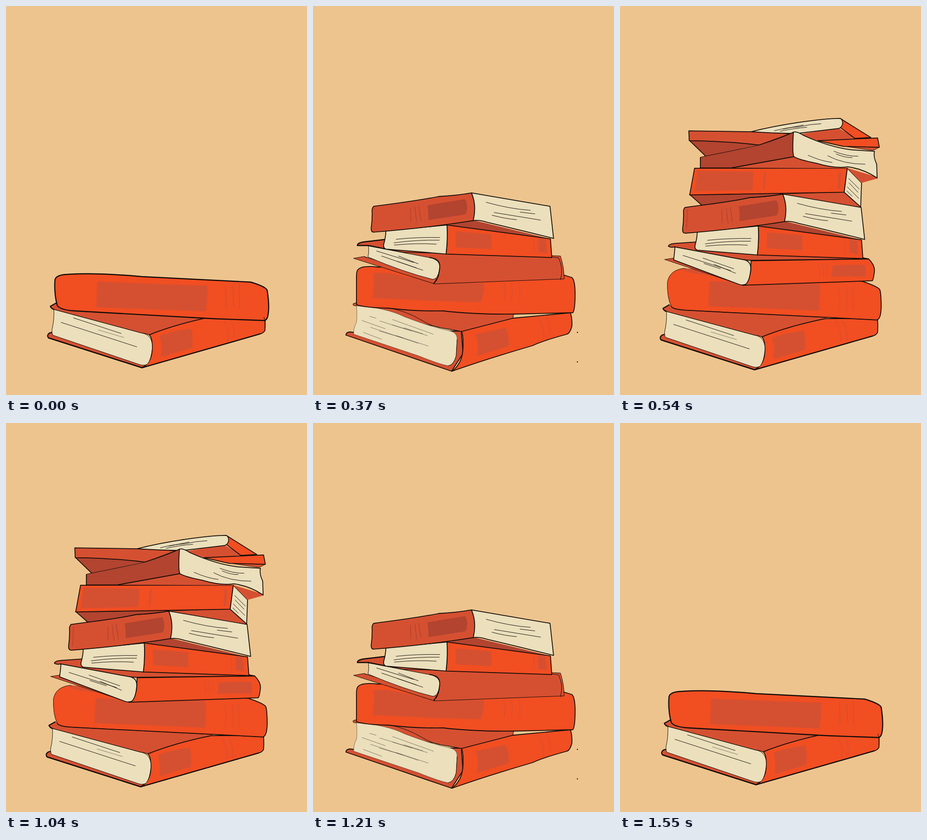
Recreate the animation shown at these times as an HTML page. Size 658 by 851 pixels, loop 1.75 s.

```html
<!DOCTYPE html>
<html lang="en">
<head>
<meta charset="utf-8">
<title>Book stack</title>
<style>
  html, body { margin: 0; width: 100%; height: 100%; overflow: hidden; background: #edc48e; }
  svg { display: block; width: 658px; height: 851px; }
  path { stroke: #0f0b08; stroke-width: 1.8; stroke-linejoin: round; stroke-linecap: round; fill: none; }
  .o { fill: #f14e22; }
  .r { fill: #d55031; }
  .d { fill: #b24430; }
  .c { fill: #ebdfbc; }
  .n { stroke: none; }
  .t { stroke-width: 1; }
  .h { stroke-width: .5; }
  .b { stroke-width: 2.4; }
  .mr { stroke: #d55031; stroke-width: 1.4; }
  .md { stroke: #b24430; stroke-width: 1.6; }
  .mb { stroke: #b35a32; stroke-width: 1.2; }
  .pic { visibility: hidden; }
</style>
</head>
<body>
<svg viewBox="0 0 658 851">
<defs>
  <g id="base">
    <path class="r b" d="M103 716L93 719Q86 724 91 730L301 797L318 786Z"/>
    <path class="r n" d="M108 651L95 659L102 666L300 719L317 724Q380 698 460 682L480 670L300 650Z"/>
    <path class="o" d="M317 723Q380 698 460 682L577 682Q578 700 577 713Q574 719 566 721L301 797Q324 785 324 752Q324 728 317 723Z"/>
    <path class="c t" d="M103 666L300 719Q325 723 324 752Q322 778 313 789Q306 793 296 790L101 724Q98 720 99 710Q104 690 103 666Z"/>
    <path class="b" d="M109 651L95 659Q97 664 103 666M91 730L301 797L566 721"/>
    <path class="t" d="M103 666L300 719Q312 720 317 723M147 685L254 720M119 695L289 750"/>
    <path class="h" d="M203 712L260 729"/>
    <path class="r n" d="M340 725Q375 713 410 709Q416 715 414 752L343 773Q347 748 340 725Z"/>
    <path class="mr" d="M482 685Q496 705 494 735M496 683Q511 705 507 731"/>
  </g>

  <g id="thick">
    <path class="o t" d="M143 569Q110 572 105 600Q104 635 114 655Q118 661 145 663L300 671L575 685Q585 683 585 655Q585 625 582 617Q578 610 545 599L450 590L190 580Z"/>
    <path class="r n" d="M143 570Q165 566 215 586Q165 582 143 575Z"/>
    <path class="r n" d="M200 598Q197 630 198 654L445 664Q448 630 447 604L275 600Z"/>
    <path class="mr" d="M489 613Q495 635 490 662M506 612Q510 638 508 664M520 610Q524 636 521 662"/>
    <path d="M114 655Q118 661 145 663L300 671L575 685Q585 683 585 655Q585 625 582 617Q578 610 545 599"/>
  </g>

  <g id="flat">
    <path class="r t" d="M99 549L119 546L280 596L275 607Z"/>
    <path class="r" d="M120 521Q112 523 107 519Q109 514 122 513L167 510L330 502L557 548L293 551Q270 551 200 537Z"/>
    <path class="o" d="M293 552L557 548Q571 562 570 575Q568 594 565 597L275 607Q290 595 292 575Z"/>
    <path class="c" d="M122 521L272 549Q294 551 292 572Q290 595 282 604Q276 608 266 605L119 550Q121 535 122 521Z"/>
    <path class="t" d="M140 540L247 574M185 546L254 570M187 558L224 570M210 560L258 580"/>
    <path class="r n" d="M475 563Q510 560 549 561Q553 575 549 588Q510 586 473 588Q477 576 475 563Z"/>
    <path class="mr" d="M443 563Q449 575 447 586M453 561Q458 574 455 586M461 561Q466 574 463 584"/>
  </g>

  <g id="split">
    <path class="d n" d="M309 474L368 463L541 505Z"/>
    <path class="o" d="M309 474L541 505L544 547L307 539Q311 505 309 474Z"/>
    <path class="c" d="M172 487L309 474Q311 505 307 539L172 528Q166 526 167 518Q172 500 172 487Z"/>
    <path class="t" d="M195 506Q240 501 293 502M190 514Q240 507 292 508M191 519Q240 514 285 517"/>
    <path class="r n" d="M329 488L408 495V528L328 524Z"/>
    <path class="r n" d="M514 503L530 505L533 538L514 534Z"/>
    <path class="mr" d="M504 505L505 535"/>
  </g>

  <g id="corner">
    <path class="r" d="M145 432Q240 420 290 410Q330 408 364 402Q374 425 371 450L368 464Q270 480 145 490Q139 490 139 482Q142 460 141 440Q142 434 145 432Z"/>
    <path class="c" d="M364 402L540 432L548 504Q460 482 400 468Q380 462 368 464Q376 430 364 402Z"/>
    <path class="d n" d="M265 430Q330 419 350 416Q358 432 351 450Q300 458 267 463Q268 445 265 430Z"/>
    <path class="md" d="M227 436L228 466M237 434L241 468M246 432L251 465"/>
    <path class="t" d="M397 423Q450 438 496 441M473 445L506 449M415 446L519 463M410 452Q440 460 465 462"/>
  </g>
  <path id="bar" class="md" d="M150 438L148 480"/>

  <g id="box">
    <path class="d" d="M155 403L182 427Q260 417 290 410Q330 408 364 402L330 395Z"/>
    <path class="r t" d="M364 402L540 432L502 397Z"/>
    <path class="o" d="M166 344H509L502 398L155 404Z"/>
    <path class="c" d="M509 344L541 377L539 431L502 398Z"/>
    <path class="r n" d="M173 350L298 352L296 393L166 396Z"/>
    <path class="r n" d="M322 354h4l-3 37h-4zM489 354h6l-2 36h-6z"/>
    <path class="t" d="M512 367L536 391M513 377L533 398M509 386L535 412M508 395L520 407"/>
  </g>

  <g id="wave">
    <path class="r n" d="M480 335L576 364L577 367L541 377L509 344L250 343L389 316Z"/>
    <path class="d t" d="M180 319Q290 297 310 292Q360 276 388 263Q386 290 389 318L250 343H179Z"/>
    <path class="c" d="M388 263Q395 260 412 271Q470 297 520 303L570 306Q567 318 575 335L576 366Q545 345 510 341Q480 345 440 333Q400 325 389 318Q385 310 388 263Z"/>
    <path d="M179 343V320M250 343L389 318M310 292Q360 276 388 263"/>
    <path class="t" d="M479 306Q510 318 533 317M465 316Q500 335 549 335M421 315Q450 328 475 331M484 312Q505 321 520 320"/>
  </g>

  <g id="slim">
    <path class="d n" d="M155 281L191 318L312 291L388 263L260 265Z"/>
    <path class="r" d="M153 260L293 262Q340 262 380 267L312 292Q240 283 154 282Z"/>
    <path d="M155 282L191 317"/>
    <path class="r n" d="M488 253L530 277L445 283L400 268Z"/>
    <path class="o" d="M493 232L562 275L526 277L490 250Z"/>
    <path class="r t" d="M505 295L581 297L567 304Z"/>
    <path class="o" d="M443 282L577 276L581 297L500 295Z"/>
    <path class="c" d="M293 262Q340 250 400 241Q460 232 493 232Q500 236 498 246Q495 254 488 255L395 266Q340 265 293 262Z"/>
    <path class="t" d="M345 260Q375 252 400 251Q425 245 450 244M358 261Q390 254 418 252M365 256L410 247"/>
  </g>

  <g id="tilt">
    <path class="d t" d="M312 220L404 242Q350 250 293 262Q240 257 185 261Q250 245 312 220Z"/>
    <path class="o" d="M318 179Q330 177 370 192Q430 218 495 232Q450 236 404 242L312 220Q320 200 318 179Z"/>
    <path class="c t" d="M179 219Q260 200 318 179Q322 195 312 220Q270 238 220 255Q200 262 170 261Q170 248 180 236Q184 225 179 219Z"/>
    <path class="b" d="M235 204Q280 194 318 179Q330 177 370 192Q430 218 495 232"/>
    <path class="t" d="M206 227Q245 208 287 205M190 238Q225 232 245 219Q262 211 284 209M205 237Q235 228 252 219M240 220Q260 213 280 213"/>
  </g>

  <g id="top">
    <path class="r t" d="M223 181L240 203L300 184Z"/>
    <path class="r t" d="M360 187L430 181L452 220Q410 208 360 187Z"/>
    <path class="o" d="M437 145L481 229L451 219L430 181Z"/>
    <path class="c" d="M231 142Q290 135 350 137Q375 128 400 130Q425 133 437 145Q435 165 430 181Q395 183 365 187L318 179L295 184Q260 182 223 180Z"/>
    <path class="t" d="M277 155Q310 157 340 153Q370 152 389 155M264 162Q300 160 328 163M280 166Q310 163 330 166"/>
  </g>

  <g id="stack3">
    <use href="#base"/><use href="#thick"/><use href="#flat"/>
  </g>
  <g id="stack8">
    <use href="#stack3"/><use href="#split"/><use href="#corner"/><use href="#bar"/>
    <use href="#box"/><use href="#slim"/><use href="#wave"/>
  </g>
</defs>

<g class="pic" id="two">
  <use href="#base" transform="translate(4.4 15.5) scale(.9735)"/>
  <path class="o b" d="M107 600Q108 588 135 587Q200 583 297 592L535 604Q568 614 571 622Q577 660 572 680Q569 689 563 688L452 684L150 667Q118 665 112 655Q105 630 107 600Z"/>
  <path class="r n" d="M199 603L440 612Q441 640 436 668L197 659Q199 630 199 603Z"/>
  <path class="mb" d="M480 611L481 660M496 613L498 658M510 608L511 662"/>
  <path class="t" d="M564 681Q567 690 566 704"/>
</g>

<g class="pic" id="three">
  <use href="#stack3" transform="translate(-8.7 -2.4) scale(1.008)"/>
</g>

<g class="pic" id="five">
  <path class="r" d="M90 714L80 713Q72 714 72 720L303 799L328 760L324 711Z"/>
  <path class="r t" d="M98 648L88 651Q85 656 95 656L200 688L325 712L437 683L440 665L165 655Z"/>
  <path class="c h" d="M95 656Q160 660 200 680Q260 703 300 711Q316 715 315 730L313 765Q308 785 296 787Q280 785 230 765L89 718Q88 705 95 692Q97 675 95 656Z"/>
  <path class="r n" d="M165 660Q230 683 278 703L325 711L437 683L300 664Z"/>
  <path class="o" d="M325 712L437 683L563 671Q567 685 566 700Q562 716 555 718Q500 733 480 743Q380 772 304 799Q328 780 328 745Q329 725 325 712Z"/>
  <path class="t" d="M165 660Q205 668 235 686Q262 703 290 706L325 712M315 730L313 765Q308 785 296 787"/>
  <path class="h" d="M124 679L138 683M174 686L263 718M146 689L216 711M174 698L250 721M107 688L158 706M126 703L230 738M145 711L196 726M182 721L252 744M110 714L150 729M199 704L240 717"/>
  <path class="r n" d="M355 718L420 704Q429 715 428 744L358 766Q364 740 355 718Z"/>
  <path class="mr" d="M493 683Q506 705 504 730M510 680Q519 695 517 715"/>
  <path class="o" d="M141 571Q106 567 98 577Q95 580 95 592V653Q110 660 165 661Q220 668 285 667Q350 675 440 674L568 671Q573 665 573 630Q573 600 566 594L550 589L264 570Z"/>
  <path class="r n" d="M132 584H165L264 605L374 606Q374 635 366 648L260 645L130 639Q135 610 132 584Z"/>
  <path class="mr" d="M417 605Q422 625 417 646M433 604Q438 625 433 645M450 603Q454 625 452 648"/>
  <path class="r t" d="M89 552L111 548L270 597L264 607Z"/>
  <path class="r b" d="M155 511L112 516Q97 518 97 524L121 524L200 540L294 540L521 546L300 505Z"/>
  <path class="r t" d="M200 539L290 541L521 546L541 547Q549 572 549 597L264 608Q278 595 277 567Z"/>
  <path class="t" d="M523 549L537 551Q548 575 541 599M113 548L118 551"/>
  <path class="c t" d="M121 525L268 553Q279 557 277 575Q273 598 262 598Q200 583 120 549Q123 538 121 525Z"/>
  <path d="M255 550Q279 555 277 572Q274 600 264 606"/>
  <path class="t" d="M139 536L220 561M150 547L240 578M187 547L230 564M185 559L226 573"/>
  <g transform="translate(-8.4 17) scale(.975)">
    <use href="#split"/><use href="#corner"/>
  </g>
  <path class="b" d="M578 714h.1M578 778.500h.1"/>
</g>

<g class="pic" id="eight">
  <use href="#stack8" transform="translate(1.4 20) scale(.9735)"/>
</g>

<g class="pic" id="ten">
  <use href="#stack8"/><use href="#top"/><use href="#tilt"/>
</g>
</svg>
<script>
  const LOOP = 1750;
  const steps = [
    [0, 'two'], [200, 'three'], [370, 'five'], [540, 'eight'], [710, 'ten'],
    [1040, 'eight'], [1210, 'five'], [1380, 'three'], [1550, 'two']
  ];
  const pics = [...document.querySelectorAll('.pic')];
  const start = performance.now();

  function draw(now) {
    const t = Math.max(0, now - start) % LOOP;
    const [, name] = steps.findLast(([from]) => t >= from);
    for (const pic of pics) pic.style.visibility = pic.id === name ? 'visible' : 'hidden';
    requestAnimationFrame(draw);
  }
  draw(start);
</script>
</body>
</html>
```
